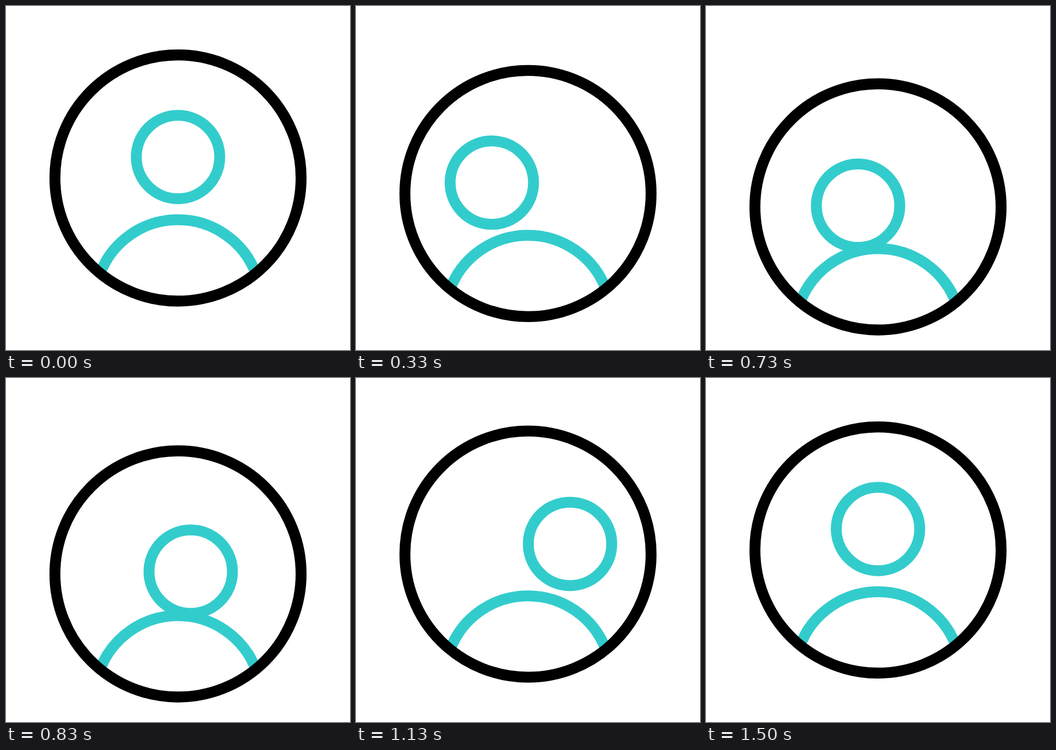
Recreate the animation shown at these times as an HTML page. Size 640 px wide and 640 px high, loop 2000 ms.

```html
<!DOCTYPE html>
<html lang="en">
<head>
<meta charset="utf-8">
<title>Profile icon</title>
<style>
  html, body { margin: 0; width: 100%; height: 100%; overflow: hidden; background: #fff; }
  svg { display: block; width: 100vw; height: 100vh; fill: none; stroke-width: 20.3; }
</style>
</head>
<body>
<svg viewBox="0 0 640 640">
  <g id="badge">
    <g stroke="#33cccc">
      <circle id="head" cx="320" cy="281" r="77.6"/>
      <path d="M175.2 497.4A155 155 0 0 1 464.8 497.4"/>
    </g>
    <circle cx="320" cy="320" r="229" stroke="#000"/>
  </g>
</svg>
<script>
  const LOOP = 2000, FPS = 30;
  const badge = document.getElementById('badge');
  const head = document.getElementById('head');

  // Smoothstep from frame `start` to `end`, blended with a share of linear motion
  function ease(frame, start, end, linear = 0) {
    const u = Math.min(1, Math.max(0, (frame - start) / (end - start)));
    return linear * u + (1 - linear) * u * u * (3 - 2 * u);
  }

  const place = (node, x, y) => node.setAttribute('transform', `translate(${x} ${y})`);
  const arch = s => 4 * s * (1 - s);

  function draw(now) {
    const frame = Math.floor((now % LOOP) * FPS / 1000 + 0.12);

    // The badge dips and returns
    place(badge, 0, 57 * (ease(frame, 0, 19.8, 0.2) - ease(frame, 19.8, 37.8, 0.2)));

    // The head rolls left, over to the right, then home, each leg slightly curved
    const left = ease(frame, 0.5, 16.3);
    const right = ease(frame, 16.3, 31.3);
    const home = ease(frame, 31.3, 39.9);
    const x = -103.6 * left + 205.6 * right - 102 * home;
    const y = 35.8 * left - 7.8 * right - 28 * home
      - 5 * arch(left) + 4 * arch(right) - 2 * arch(home);
    place(head, x, y);

    requestAnimationFrame(draw);
  }
  requestAnimationFrame(draw);
</script>
</body>
</html>
```
